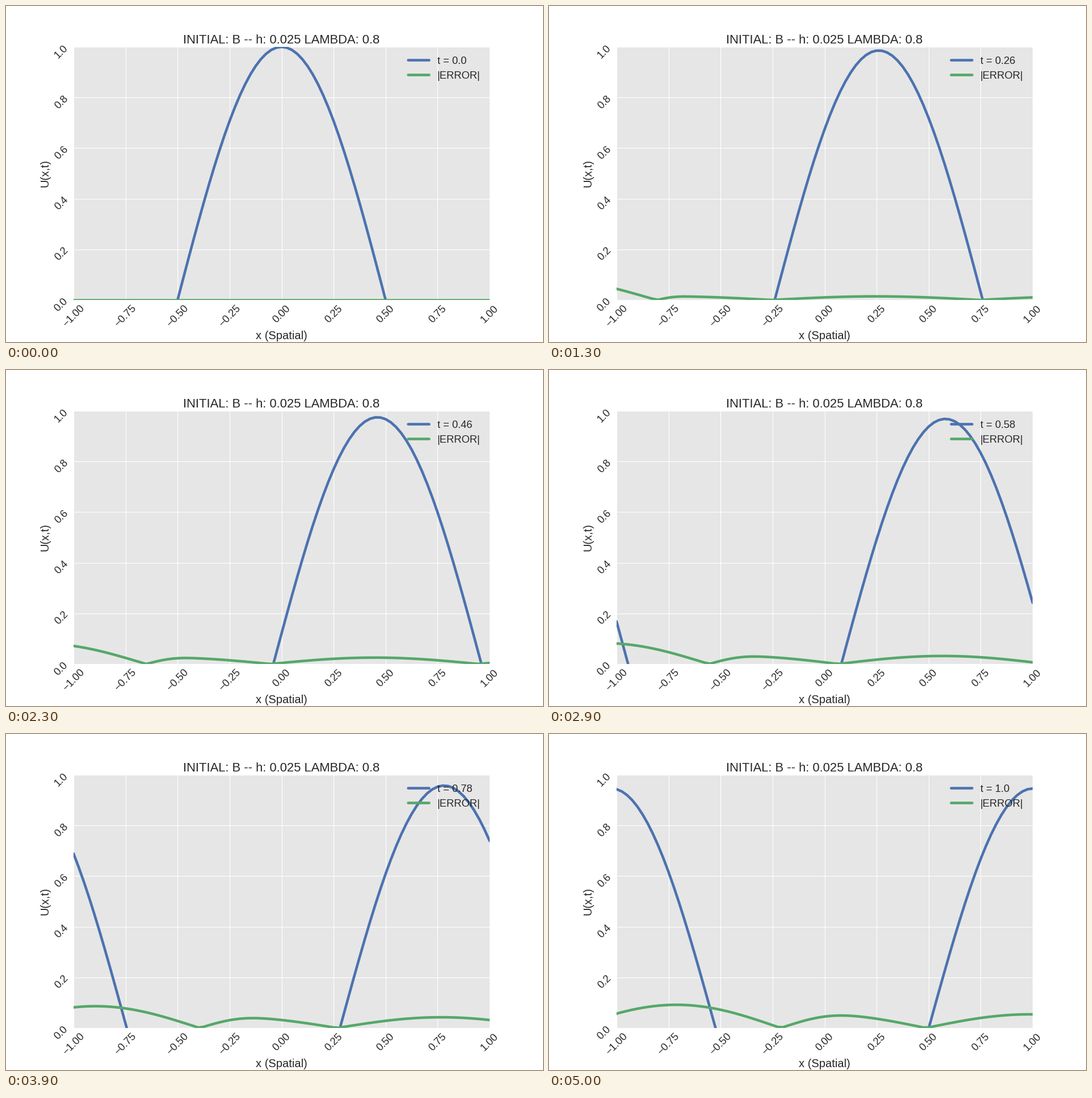
Animation, 946 px wide and 592 px high, one loop 5.1 s. Source, as a matplotlib script:

```python
import matplotlib.pyplot as plt
import numpy as np
from matplotlib.animation import FuncAnimation

DPI = 132
WIDTH, HEIGHT = 946, 592
LEFT, TOP, AX_W, AX_H = 119, 72, 733, 446
H, LAM = 0.025, 0.8
STEP = H * LAM
FRAMES, INTERVAL = 51, 100
INK = "#262626"
BLUE, GREEN = "#4C72B0", "#55A868"

plt.rcParams.update({
    "font.family": "Liberation Sans",
    "text.color": INK,
    "axes.labelcolor": INK,
    "xtick.color": INK,
    "ytick.color": INK,
    "lines.linewidth": 2.5,
    "lines.solid_capstyle": "round",
})


def axes_point(px, py):
    """Convert pixels from the top left of the stage to axes fractions."""
    return (px - LEFT) / AX_W, 1 - (py - TOP) / AX_H


def lax_friedrichs(u):
    """Advance one step of u_t + u_x = 0 on the ring of grid points."""
    left, right = np.roll(u, 1), np.roll(u, -1)
    return (left + right) / 2 - LAM * (right - left) / 2


x = np.linspace(-1, 1, round(2 / H) + 1)
waves = [np.cos(np.pi * x)]
for _ in range(FRAMES - 1):
    waves.append(lax_friedrichs(waves[-1]))

fig = plt.figure(figsize=(WIDTH / DPI, HEIGHT / DPI), dpi=DPI, facecolor="white")
box = [LEFT / WIDTH, 1 - (TOP + AX_H) / HEIGHT, AX_W / WIDTH, AX_H / HEIGHT]
ax = fig.add_axes(box, facecolor="#E6E6E6")
ax.set(xlim=(-1, 1), ylim=(0, 1))
ax.set_xticks(np.linspace(-1, 1, 9))
ax.set_yticks(np.linspace(0, 1, 6))
ax.spines[:].set_visible(False)
ax.set_axisbelow(True)
ax.grid(color="white", linewidth=0.6)
ax.tick_params(length=0, pad=3.5, labelsize=10, labelrotation=45)
ax.set_title(f"INITIAL: B -- h: {H} LAMBDA: {LAM}", fontsize=12, pad=3.3)
ax.set_xlabel("x (Spatial)", fontsize=11, va="center")
ax.set_ylabel("U(x,t)", fontsize=11, va="center")
ax.xaxis.set_label_coords(*axes_point(LEFT + AX_W / 2, 581.5))
ax.yaxis.set_label_coords(*axes_point(68.5, TOP + AX_H / 2))

wave_line, = ax.plot(x, waves[0], color=BLUE, label="t = 0.0")
error_line, = ax.plot(x, 0 * x, color=GREEN, label="|ERROR|")
legend = ax.legend(loc="upper right", frameon=False, fontsize=10)
time_text = legend.get_texts()[0]


def update(i):
    t = i * STEP
    wave_line.set_ydata(waves[i])
    error_line.set_ydata(np.abs(np.cos(np.pi * (x - t)) - waves[i]))
    time_text.set_text(f"t = {round(t, 2)}")
    return wave_line, error_line, time_text


anim = FuncAnimation(fig, update, frames=FRAMES, interval=INTERVAL, repeat=True)
plt.show()
```
